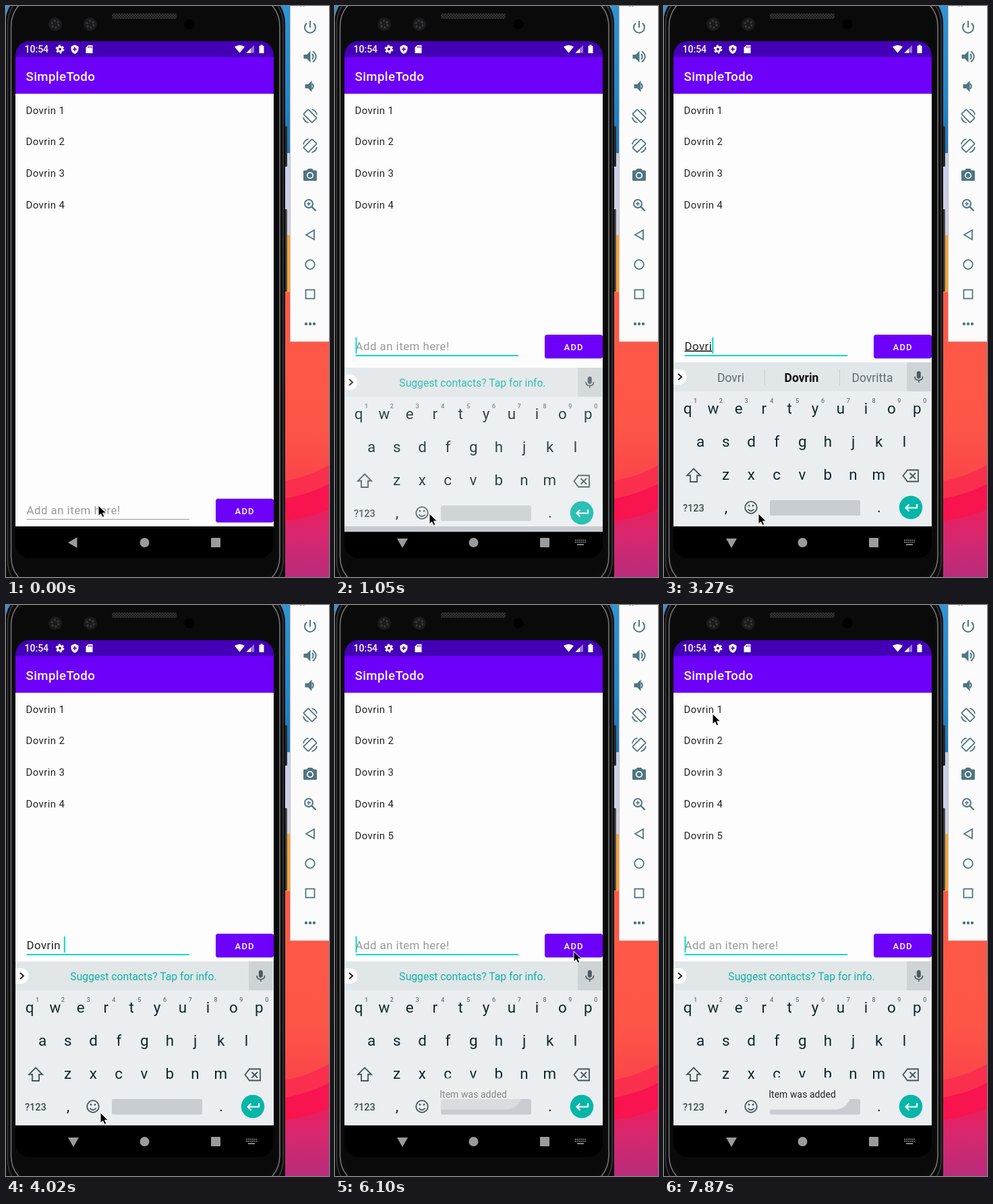
Write an HTML page that moves like this. It is 479 px wide and 846 px high and loops after 8000 ms.

```html
<!DOCTYPE html>
<html lang="en">
<head>
<meta charset="utf-8">
<title>Todo app demo</title>
<style>
  html, body { margin: 0; width: 100%; height: 100%; overflow: hidden; background: #0b0b0b; }
  svg { display: block; width: 479px; height: 846px; font-family: Roboto, sans-serif; }
  text { white-space: pre; }
  .mid { text-anchor: middle; }
  .item { font-size: 14.9px; letter-spacing: .45px; fill: #222; }
  .field { font-size: 16.8px; letter-spacing: .5px; fill: #222; }
  .key { font-size: 22.4px; fill: #12262d; text-anchor: middle; }
  .hint { font-size: 9px; font-weight: 500; fill: #69757b; text-anchor: middle; }
  .word { font-size: 17.5px; fill: #5f6b71; text-anchor: middle; }
  .line { fill: none; stroke: #4e7682; stroke-width: 2; }
  .solid { fill: #4e7682; }
</style>
</head>
<body>
<svg viewBox="0 0 479 846">
  <defs>
    <linearGradient id="wall" x2="0" y2="1">
      <stop offset="0" stop-color="#2f93d4"/>
      <stop offset=".16" stop-color="#2187c9"/>
      <stop offset=".257" stop-color="#1c74b4"/>
      <stop offset=".258" stop-color="#c3d0ee"/>
      <stop offset=".4" stop-color="#cfd0e2"/>
      <stop offset=".402" stop-color="#f2a43c"/>
      <stop offset=".5" stop-color="#f7a530"/>
      <stop offset=".502" stop-color="#fd5a47"/>
      <stop offset=".74" stop-color="#fd5547"/>
      <stop offset=".83" stop-color="#fb4549"/>
      <stop offset="1" stop-color="#f4154f"/>
    </linearGradient>
    <linearGradient id="dusk" x2="0" y2="1">
      <stop offset="0" stop-color="#ea1f5f"/>
      <stop offset=".45" stop-color="#d42870"/>
      <stop offset="1" stop-color="#b92b7a"/>
    </linearGradient>
    <pattern id="mesh" width="4" height="4" patternUnits="userSpaceOnUse">
      <rect width="4" height="4" fill="#1d1d1d"/>
      <path d="M0 0L4 4M4 0L0 4" stroke="#3a3a3a" stroke-width=".8"/>
    </pattern>
  </defs>

  <rect width="479" height="846" fill="url(#wall)"/>
  <path d="M400 706Q445 700 479 680V846H400Z" fill="#fa2f4e"/>
  <path d="M400 732Q445 726 479 708V846H400Z" fill="#f7144f"/>
  <path d="M400 764Q440 762 479 746V846H400Z" fill="url(#dusk)"/>

  <!-- phone body -->
  <rect x="411" y="178" width="6" height="60" rx="1.5" fill="#28292c"/>
  <rect x="411" y="301" width="6" height="122" rx="1.5" fill="#28292c"/>
  <path d="M416 302V422" stroke="#777"/>
  <rect x="-1" y="-26" width="415" height="920" rx="52" fill="#0c0c0c"/>
  <g fill="none">
    <rect x="2.500" y="-23" width="408.500" height="895" rx="50" stroke="#3d3d3d" stroke-width="1.500"/>
    <rect x="7.500" y="-17" width="398.500" height="880" rx="47" stroke="#727375" stroke-width="1.600"/>
  </g>
  <rect x="11" y="-12" width="391" height="866" rx="42" fill="#0a0a0a"/>
  <rect x="157" y="11" width="96" height="8" rx="2" fill="url(#mesh)"/>
  <g id="lenses"></g>
  <circle cx="272" cy="27" r="7.500" fill="#000"/>

  <!-- screen -->
  <rect x="14" y="52" width="383" height="766" rx="21" fill="#000"/>
  <path d="M14 76V73A21 21 0 0 1 35 52H376A21 21 0 0 1 397 73V76Z" fill="#4300b6"/>
  <rect x="14" y="75.500" width="383" height="54.500" fill="#6c00f8"/>
  <rect x="14" y="130" width="383" height="641" fill="#fdfdfd"/>
  <g fill="#fff">
    <text x="27.500" y="69" font-size="14" font-weight="500">10:54</text>
    <circle cx="80" cy="64" r="3.400" fill="none" stroke="#fff" stroke-width="2.800"/>
    <circle cx="80" cy="64" r="5.400" fill="none" stroke="#fff" stroke-width="2" stroke-dasharray="2.83 2.83"/>
    <path d="M102 57.500L107.500 60V64Q107 69 102 71Q97 69 96.500 64V60Z"/>
    <path d="M102 61V67M99 64H105" stroke="#4300b6" stroke-width="1.600"/>
    <path d="M122 58H128.500V70H118.500V61.500Z"/>
    <path d="M122.500 59.500V62M124.700 59.500V62M126.900 59.500V62" stroke="#4300b6"/>
    <path d="M339 60.500Q346.500 55.500 354 60.500L346.500 69.500Z"/>
    <path d="M368 58V69.500H356.500Z" opacity=".45"/>
    <path d="M363 63V69.500H356.500Z"/>
    <path d="M377.500 57.500H380.500V59H382.500V70H375.500V59H377.500Z"/>
    <text x="29.500" y="110.500" font-size="18.650" font-weight="500" letter-spacing=".4">SimpleTodo</text>
  </g>
  <g id="items"></g>

  <!-- input row -->
  <g id="row">
    <path id="rule"/>
    <text id="hint" class="field" x="30.500" y="509.500" style="fill:#999">Add an item here!</text>
    <text id="input" class="field" x="30.500" y="509.500"></text>
    <rect id="caret" y="491" width="2" height="24" fill="#03dac5"/>
    <rect x="311" y="488" width="86" height="35" rx="4" fill="#000" opacity=".2"/>
    <rect x="311" y="487" width="86" height="35" rx="3.500" fill="#6c00f8"/>
    <rect id="ripple" x="311" y="487" width="86" height="35" rx="3.500" fill="#fff"/>
    <text x="339.500" y="510" font-size="13.050" font-weight="500" letter-spacing="1.200" fill="#fff">ADD</text>
  </g>

  <!-- navigation bar -->
  <g fill="#9b9b9b">
    <path id="back" d="M92 795L105.500 787V803Z"/>
    <path id="down" d="M92 789H108L100 803Z"/>
    <circle cx="205.500" cy="795" r="7"/>
    <rect x="304" y="788" width="14" height="14" rx="1"/>
    <g id="switcher" fill="none" stroke="#9b9b9b">
      <path d="M356 791.500H372M356 794.500H372" stroke-width="1.700" stroke-dasharray="1.800 1"/>
      <path d="M359 798H369" stroke-width="1.700"/>
    </g>
  </g>

  <!-- keyboard -->
  <g id="keyboard">
    <rect x="14" y="528" width="383" height="243" fill="#eaeef1"/>
    <rect x="14" y="528" width="383" height="43" fill="#e1e6e8"/>
    <rect x="360" y="528" width="35.500" height="43" fill="#ced3d5"/>
    <path d="M14 538H22A11.500 11.500 0 0 1 22 561H14Z" fill="#fff"/>
    <path d="M21 545L26 549.500L21 554" fill="none" stroke="#222" stroke-width="2"/>
    <rect x="374.800" y="541" width="6" height="11" rx="3" fill="#4c5960"/>
    <path d="M372 549Q372 554.500 377.800 554.500T383.600 549M377.800 554.500V558" fill="none" stroke="#4c5960" stroke-width="1.600"/>
    <text id="prompt" class="mid" x="204" y="556" font-size="15.700" fill="#0db5a6">Suggest contacts? Tap for info.</text>
    <g id="words"><path d="M149.500 538V562M260.500 538V562" stroke="#c6cbce"/></g>
    <g id="keys"></g>
    <text x="28" y="748.500" font-size="14.500" font-weight="500" fill="#3b4a51">?123</text>
    <rect x="157" y="732" width="134" height="23" rx="2.500" fill="#c8cdd1"/>
    <g fill="none" stroke="#45545b" stroke-width="1.800">
      <path d="M44 685.500L54 695.500H49V705H39V695.500H34Z"/>
      <path d="M361 687.500H377V704.500H361L354.500 696Z"/>
      <path d="M364.500 692L373 700.500M373 692L364.500 700.500"/>
      <circle cx="129" cy="743" r="8.800"/>
      <path d="M124.500 745.500Q129 751 133.500 745.500"/>
    </g>
    <path d="M126 739V741.600M132 739V741.600" stroke="#45545b" stroke-width="2.400"/>
    <circle cx="366" cy="743" r="17.300" fill="#06b6a8"/>
    <path d="M375 738V743.500H359M363.500 738.500L358.500 743.500L363.500 748.500" fill="none" stroke="#fff" stroke-width="2.200"/>
  </g>

  <g id="toast">
    <rect x="133" y="700" width="144" height="47.500" rx="23" fill="#ebeeef"/>
    <text class="mid" x="205" y="729.500" font-size="13.900" letter-spacing=".1" fill="#222">Item was added</text>
  </g>

  <!-- emulator toolbar -->
  <rect x="421" width="58" height="497.500" fill="#c9b9b6"/>
  <rect x="422" width="57" height="497" fill="#fbfbfb"/>
  <path d="M435 -2L437.500 1L440 -2M439 -2L441.500 1L444 -2" fill="none" stroke="#888"/>
  <g class="line">
    <path d="M451 22V32M446 25.500A8 8 0 1 0 456 25.500"/>
    <path d="M454 71Q457.500 75 454 79M455 67Q464.500 75 455 83"/>
    <path d="M454 115Q457.500 119 454 123"/>
    <g id="turn" stroke-width="1.800">
      <rect x="446" y="154" width="10" height="18" rx="1" transform="rotate(-45 451 163)"/>
      <path d="M453.500 153Q460 155 461 161M448.500 173Q442 171 441 165"/>
    </g>
    <use href="#turn" transform="matrix(-1 0 0 1 902 44)"/>
    <circle cx="449" cy="293" r="6"/>
    <path d="M453.500 297.500L459.500 303.500" stroke-width="2.400"/>
    <path d="M446 293H452M449 290V296" stroke-width="1.500"/>
    <path d="M445 339L457 332V346Z" stroke-width="1.800"/>
    <circle cx="451" cy="383" r="6.800" stroke-width="1.800"/>
    <rect x="444.500" y="420.500" width="13" height="13" stroke-width="1.800"/>
  </g>
  <g class="solid">
    <path id="speaker" d="M441.500 72H446L451.500 66.500V83.500L446 78H441.500Z"/>
    <use href="#speaker" x="2" y="44"/>
    <path d="M441 245Q441 243.500 442.500 243.500H446L448 241H454L456 243.500H459.500Q461 243.500 461 245V257.500Q461 259 459.500 259H442.500Q441 259 441 257.500Z"/>
    <circle cx="445" cy="471" r="2.200"/><circle cx="451" cy="471" r="2.200"/><circle cx="457" cy="471" r="2.200"/>
  </g>
  <circle cx="451" cy="251" r="4.200" fill="#4e7682" stroke="#fbfbfb" stroke-width="1.800"/>

  <path id="pointer" d="M0 0V15.500L3.600 12.300L6 17.500L8.800 16.200L6.500 11.200H11.500Z" fill="#000" stroke="#fff" stroke-width="1"/>
</svg>
<script>
const LOOP = 8000;
const NAME = "Dovrin";
const $ = id => document.getElementById(id);

function add(parent, tag, attrs, label = "") {
  const node = document.createElementNS("http://www.w3.org/2000/svg", tag);
  for (const key in attrs) node.setAttribute(key, attrs[key]);
  node.textContent = label;
  return parent.appendChild(node);
}

for (const x of [73, 125]) {
  add($("lenses"), "circle", { cx: x, cy: 27, r: 10, fill: "#1b1b1c" });
  add($("lenses"), "circle", { cx: x, cy: 27, r: 5, fill: "none", stroke: "#34383c", "stroke-width": 3, "stroke-dasharray": "3 2.2" });
}

const items = [1, 2, 3, 4, 5].map(n =>
  add($("items"), "text", { class: "item", x: 29.5, y: 159.5 + 46.8 * (n - 1) }, `${NAME} ${n}`));

const keyRows = [["qwertyuiop", 35, 603.5], ["asdfghjkl", 54, 653], ["zxcvbnm", 91.5, 702]];
for (const [letters, x, y] of keyRows)
  [...letters].forEach((c, i) => add($("keys"), "text", { class: "key", x: x + 37.8 * i, y }, c));
for (let i = 0; i < 10; i++)
  add($("keys"), "text", { class: "hint", x: 46.5 + 37.8 * i, y: 588 }, (i + 1) % 10);
add($("keys"), "text", { class: "key", x: 92, y: 750 }, ",");
add($("keys"), "text", { class: "key", x: 319, y: 750 }, ".");

const words = [99, 204, 309].map((x, i) =>
  add($("words"), "text", { class: "word", x, y: 556.5, style: i === 1 ? "font-weight:700;fill:#111" : "" }));

// Each track holds [start, ...values]; a value lasts until the next start.
const pointer = [
  [0, 137, 740], [300, 138, 746], [450, 140, 752],
  [4910, 168, 732], [5060, 286, 588], [5200, 341, 497], [5350, 350, 508], [5500, 354, 513],
  [6840, 318, 486], [6980, 100, 360], [7280, 84, 215], [7430, 75, 170], [7580, 72, 161]
];
const typed = [
  [0, ""], [2530, "D"], [2830, "Do"], [2980, "Dov"], [3120, "Dovr"], [3270, "Dovri"],
  [3570, NAME], [4020, NAME + " "], [4460, NAME + " 5"], [5950, ""]
];
const suggestions = [
  [0, "prompt"], [2830, "Do", "Don't", "Does"], [2980, "Dov", "Dove", "Doves"],
  [3120, "Dovr", "Dovrin", "Doves"], [3270, "Dovri", "Dovrin", "Dovritta"],
  [3570, "Dovrina", "Dovrin", "Dovritta"], [4020, "prompt"], [4460, ""], [5950, "prompt"]
];
const caret = [
  [0, 0], [750, 1], [1340, 0], [1790, 1], [2390, 0], [2530, 1], [4910, 0], [5350, 1], [5800, 0],
  [5950, 1], [6400, 0], [6840, 1], [7430, 0], [7870, 1]
];
const slide = [[0, 0, 0], [900, 28, .4], [1050, 8, .85], [1190, 1, .97], [1340, 0, 1]];
const ripple = [[0, 0], [5800, .24], [5950, .12], [6100, 0]];
const toast = [[0, 0], [5950, .1], [6100, .5], [6250, .85], [6400, 1]];

const at = (track, t) => track.findLast(step => step[0] <= t).slice(1);
const show = (id, on) => $(id).setAttribute("visibility", on ? "visible" : "hidden");
const fade = (id, alpha) => $(id).setAttribute("opacity", alpha);
const move = (id, x, y) => $(id).setAttribute("transform", `translate(${x} ${y})`);

function draw(t) {
  const open = t >= 900;
  const focused = t >= 750;
  const [text] = at(typed, t);
  const composing = t >= 2530 && t < 4020;
  const strip = at(suggestions, t);
  const ruleWidth = focused ? 2 : 1;

  move("row", 0, open ? 0 : 243);
  $("rule").setAttribute("d", `M30.500 ${517 + ruleWidth / 2}H272`);
  $("rule").setAttribute("stroke", focused ? "#03dac5" : "#9a9a9a");
  $("rule").setAttribute("stroke-width", ruleWidth);
  show("hint", !text);
  $("input").textContent = text;
  $("input").style.textDecoration = composing ? "underline" : "none";
  $("caret").setAttribute("x", 30.5 + (text ? $("input").getComputedTextLength() : 0));
  show("caret", at(caret, t)[0]);
  fade("ripple", at(ripple, t)[0]);

  show("back", !open);
  show("down", open);
  show("switcher", open);
  const [offset, alpha] = at(slide, t);
  move("keyboard", 0, offset);
  fade("keyboard", alpha);
  fade("prompt", strip[0] === "prompt" ? 1 : 0);
  fade("words", strip.length === 3 ? 1 : 0);
  words.forEach((node, i) => node.textContent = strip[i] || "");

  items[4].setAttribute("visibility", t >= 5950 ? "visible" : "hidden");
  fade("toast", at(toast, t)[0]);
  move("pointer", ...at(pointer, t));
}

const start = performance.now();
function tick() {
  draw((performance.now() - start) % LOOP);
  requestAnimationFrame(tick);
}
tick();
</script>
</body>
</html>
```
